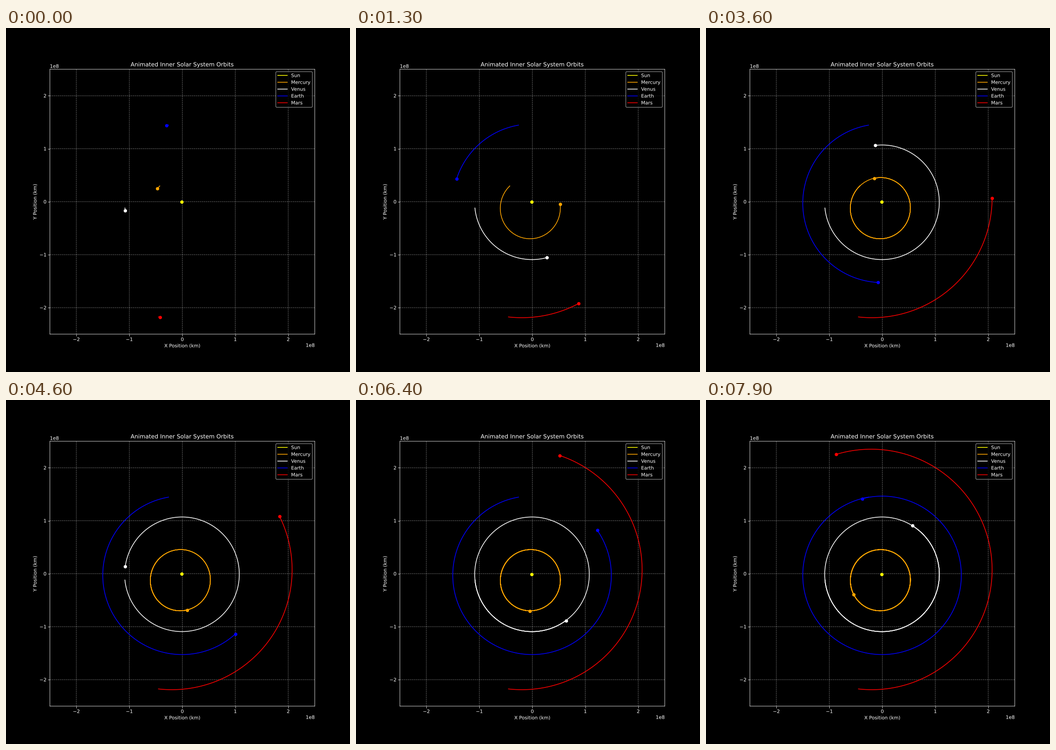
Write a matplotlib script that moves like this. It is 748 px wide and 748 px high and loops after 8000 ms.

```python
import numpy as np
import matplotlib.pyplot as plt
from matplotlib.animation import FuncAnimation
from matplotlib.patheffects import Normal

FRAMES, INTERVAL = 80, 100
STEP = 1.555      # days between trail samples
STRIDE = 3        # samples added per frame
AU = 1.49598e8    # km
YEAR = 365.256    # days

days = STEP * np.arange(STRIDE * FRAMES + 2)

# The Sun drifts slowly about the barycentre; x + iy in km
sun = 1e6 * (-1.18 - 0.43j + (0.81 - 0.78j) * days / 1000)


def orbit(axis, ecc, perihelion, anomaly):
    """Kepler ellipse around the Sun; the period follows from the axis (AU)."""
    mean = np.radians(anomaly) + 2 * np.pi * days / (YEAR * axis ** 1.5)
    angle = mean
    for _ in range(20):
        angle = mean + ecc * np.sin(angle)
    ellipse = np.cos(angle) - ecc + 1j * np.sqrt(1 - ecc ** 2) * np.sin(angle)
    return sun + axis * AU * ellipse * np.exp(1j * np.radians(perihelion))


plt.style.use("dark_background")
plt.rcParams["text.hinting"] = "none"
fig, ax = plt.subplots(figsize=(10, 10), dpi=74.8)
ax.set_aspect("equal")
ax.set(xlim=(-2.5e8, 2.5e8), ylim=(-2.5e8, 2.5e8),
       xticks=np.arange(-2, 3) * 1e8, yticks=np.arange(-2, 3) * 1e8,
       xlabel="X Position (km)", ylabel="Y Position (km)",
       title="Animated Inner Solar System Orbits")
ax.grid(True, linestyle="--", alpha=0.5)

bodies = []


def add_body(name, color, path):
    trail, = ax.plot([], [], color=color, lw=1.5, label=name)
    dot, = ax.plot([], [], "o", color=color)
    bodies.append((path, trail, dot))


add_body("Sun", "yellow", sun)
add_body("Mercury", "orange", orbit(0.3871, 0.2056, 77.5, 46.15))
add_body("Venus", "white", orbit(0.7233, 0.0068, 131.6, 53.85))
add_body("Earth", "blue", orbit(1.0, 0.0167, 102.94, -3.12))
add_body("Mars", "red", orbit(1.5237, 0.0934, 336.06, -67.2))
ax.legend(loc="upper right")

# Place lines and glyphs at exact sub-pixel positions
for artist in fig.findobj():
    artist.set_snap(False)
for text in fig.findobj(plt.Text):
    text.set_path_effects([Normal()])


def update(i):
    end = STRIDE * i + 2
    for path, trail, dot in bodies:
        trail.set_data(path.real[:end], path.imag[:end])
        dot.set_data(path.real[end - 1:end], path.imag[end - 1:end])
    return [artist for _, *pair in bodies for artist in pair]


anim = FuncAnimation(fig, update, frames=FRAMES, interval=INTERVAL,
                     repeat=True, repeat_delay=0)
plt.show()
```
